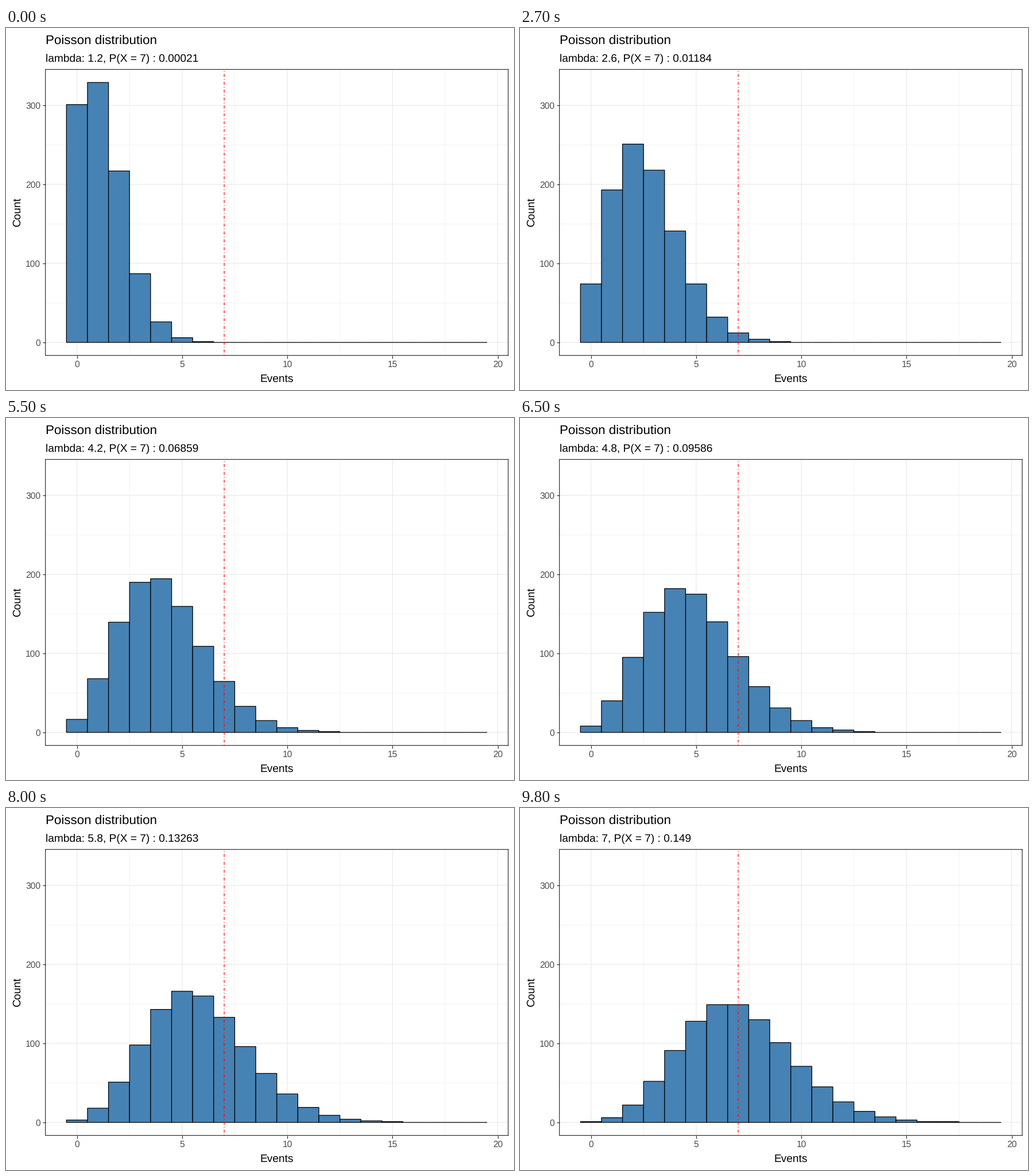
Animation of 885 by 632 pixels, one loop 10 s. Source, as a matplotlib script:

```python
import math

import matplotlib.pyplot as plt
import numpy as np
from matplotlib.animation import FuncAnimation
from matplotlib.patches import Rectangle

plt.rcParams["font.family"] = "Liberation Sans"
plt.rcParams["text.hinting"] = "none"
plt.rcParams["path.snap"] = False

WIDTH, HEIGHT, DPI = 885, 632, 125
LEFT, RIGHT, TOP, BOTTOM = 68.65, 874.9, 72.4, 571.6
FRAMES, INTERVAL = 100, 100
STATES, BINS, DRAWS = 30, 20, 1000
EVENT = 7
Y_MAX = 329
LINE = 1.25
GREY20, GREY30, GREY92 = "#333333", "#4D4D4D", "#EBEBEB"


def rate(i):
    return round(1.2 + 0.2 * i, 1)


def pmf(k, lam):
    return math.exp(-lam) * lam**k / math.factorial(k)


def histogram(lam):
    """Expected bar heights; the tallest bar sets the top of the axis."""
    counts = [round(DRAWS * pmf(k, lam)) for k in range(BINS)]
    return np.minimum(counts, Y_MAX)


def arrival(i):
    """Frame at which state i is fully reached."""
    return 4 * i - 1 if i < 12 else 3 * i + 11


def pose(frame):
    """State shown in the subtitle and the bar heights, halfway while moving."""
    i = max(k for k in range(STATES) if arrival(k) <= frame + 1)
    counts = histogram(rate(i))
    if arrival(i) == frame + 1:
        counts = (histogram(rate(i - 1)) + counts) / 2
    return i, counts


def px(width):
    return width * 72 / DPI


def label(x, y, text, size, color="black", **kwargs):
    return fig.text(x / WIDTH, 1 - y / HEIGHT, text, fontsize=size, color=color,
                    va="baseline", **kwargs)


def grid(draw_line, positions, width, zorder):
    for p in positions:
        draw_line(p, color=GREY92, lw=px(width), zorder=zorder)


fig = plt.figure(figsize=(WIDTH / DPI, HEIGHT / DPI), dpi=DPI, facecolor="white")
ax = fig.add_axes([LEFT / WIDTH, 1 - BOTTOM / HEIGHT,
                   (RIGHT - LEFT) / WIDTH, (BOTTOM - TOP) / HEIGHT])
x_ticks, y_ticks = range(0, 21, 5), range(0, 301, 100)
ax.set_xlim(-1.5, 20.5)
ax.set_ylim(-0.05 * Y_MAX, 1.05 * Y_MAX)
ax.set_xticks(x_ticks)
ax.set_yticks(y_ticks)
ax.tick_params(length=px(4.8), width=px(LINE), color=GREY20,
               labelbottom=False, labelleft=False)
for spine in ax.spines.values():
    spine.set(color=GREY20, linewidth=px(LINE), zorder=5)

grid(ax.axvline, np.arange(2.5, 20, 5), LINE / 2, 0)
grid(ax.axhline, range(50, 300, 100), LINE / 2, 0)
grid(ax.axvline, x_ticks, LINE, 1)
grid(ax.axhline, y_ticks, LINE, 1)
for x in x_ticks:
    label(LEFT + (x + 1.5) / 22 * (RIGHT - LEFT), 592.3, str(x), 9, GREY30, ha="center")
for y in y_ticks:
    y_px = BOTTOM - (y / Y_MAX + 0.05) / 1.1 * (BOTTOM - TOP)
    label(60.2, y_px + 5.9, str(y), 9, GREY30, ha="right")

bars = [ax.add_patch(Rectangle((k - 0.5, 0), 1, 0, facecolor="#4682B4",
                               edgecolor="black", lw=px(LINE), zorder=2))
        for k in range(BINS)]
ax.plot([EVENT, EVENT], ax.get_ylim(), color="red", lw=px(LINE), zorder=3,
        linestyle=(0, (1, 3, 4, 3)), dash_capstyle="butt")

label(69, 28.3, "Poisson distribution", 12.9)
subtitle = label(69, 58.7, "", 11)
label((LEFT + RIGHT) / 2, 618, "Events", 11, ha="center")
label(25.3, (TOP + BOTTOM) / 2 - 1, "Count", 11, ha="center",
      rotation=90, rotation_mode="anchor")


def draw(frame):
    i, counts = pose(frame)
    for bar, count in zip(bars, counts):
        bar.set_height(count)
    lam = rate(i)
    subtitle.set_text(f"lambda: {lam:g}, P(X = {EVENT}) : {round(pmf(EVENT, lam), 5):g}")
    return [*bars, subtitle]


animation = FuncAnimation(fig, draw, frames=FRAMES, interval=INTERVAL,
                          repeat=True, repeat_delay=0)
plt.show()
```
